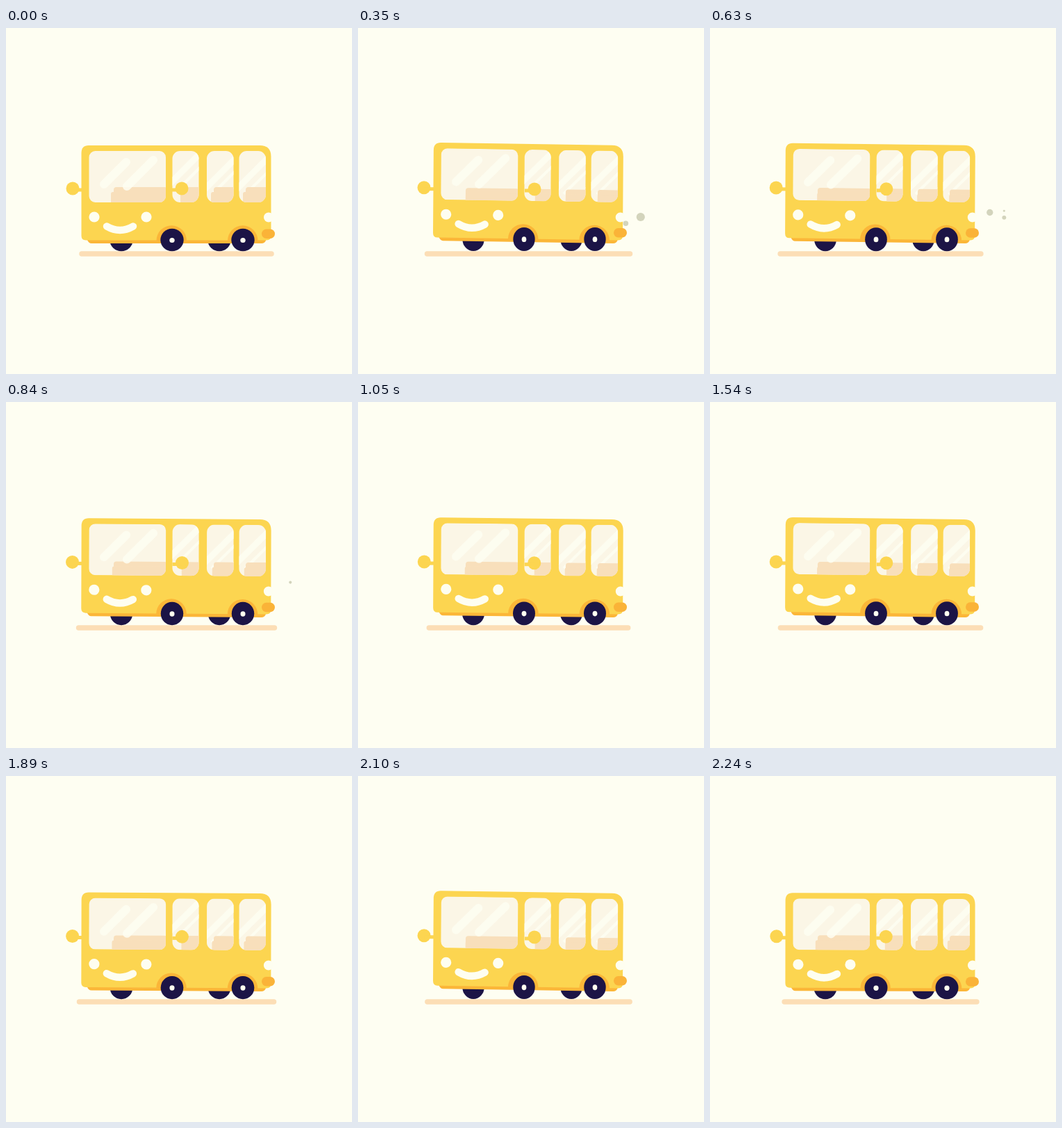
An HTML page for the animation above (2310 ms loop, 498 px wide and 498 px high).

```html
<!DOCTYPE html>
<html lang="en">
<head>
<meta charset="utf-8">
<title>Bus</title>
<style>
  html, body { margin: 0; width: 100%; height: 100%; overflow: hidden; background: #fefef2; }
  svg { display: block; width: 100vw; height: 100vh; }
</style>
</head>
<body>
<svg viewBox="0 0 498 498">
  <defs>
    <clipPath id="glass">
      <rect x="119.500" y="177" width="110.500" height="74" rx="9"/>
      <rect x="239.500" y="177" width="38" height="74" rx="11"/>
      <rect x="289" y="177" width="38.500" height="74" rx="11"/>
      <rect x="335.500" y="177" width="38.500" height="74" rx="11"/>
    </clipPath>
  </defs>

  <line id="shadow" y1="325" y2="325" stroke="#fcdeb6" stroke-width="7.500" stroke-linecap="round"/>
  <g id="smoke" fill="#d3d4bc"></g>
  <g id="farWheels"></g>

  <g id="body">
    <path d="M117 302H374V306Q372 310 368 310H123Q119 310 117 305Z" fill="#fbb638"/>
    <path d="M119 169H365Q381.500 169 381.500 185V299Q381.500 305.500 375 305.500H115Q108.500 305.500 108.500 299V180Q108.500 169 119 169Z" fill="#fcd550"/>
    <g clip-path="url(#glass)">
      <rect x="100" y="170" width="290" height="90" fill="#fbf6e6"/>
      <g stroke="#fefef2" stroke-opacity=".85" fill="none">
        <path d="M234 226L278 182M284 234L332 186M330 234L378 186" stroke-width="9"/>
        <path d="M246 234L284 196M296 240L334 202M344 240L382 202" stroke-width="4"/>
      </g>
      <g id="seats" fill="#f8dfbb"></g>
      <path d="M141 225L173 193M174 228L212 190" stroke="#fefef2" stroke-opacity=".85" stroke-width="12" stroke-linecap="round"/>
    </g>
    <g fill="#fefef0">
      <circle cx="127" cy="272" r="7.600"/>
      <circle cx="202" cy="272" r="7.600"/>
      <circle cx="378" cy="272.500" r="7"/>
    </g>
    <path d="M145 285.500Q164 296.500 183 285.500" fill="none" stroke="#fefef0" stroke-width="10.500" stroke-linecap="round"/>
    <g fill="#fbb638">
      <path d="M216.500 306A21.700 21.700 0 0 1 260 306Z"/>
      <path d="M319 306A21.700 21.700 0 0 1 362.500 306Z"/>
    </g>
  </g>

  <rect id="bumper" x="368" width="19" height="13.500" rx="6.700" fill="#fab338"/>
  <g id="mirrors" fill="#fcd550" stroke="#fcd550"></g>
  <g id="wheels"></g>
</svg>
<script>
  const LOOP = 2310, STEP = 70, BOUNCES = 5;
  const $ = id => document.getElementById(id);

  function add(parent, tag, attrs = {}) {
    const el = document.createElementNS('http://www.w3.org/2000/svg', tag);
    parent.append(el);
    return set(el, attrs);
  }

  function set(el, attrs) {
    for (const name in attrs) el.setAttribute(name, attrs[name]);
    return el;
  }

  // Phase and lift of the nose: a springy rise and a quick drop.
  const lifts = [[0, 0], [.09, .37], [.27, .7], [.35, .82], [.6, 1], [.758, 1], [.848, .2], [1, 0]];

  function liftAt(phase) {
    const i = Math.max(1, lifts.findIndex(p => p[0] >= phase));
    const [p0, v0] = lifts[i - 1], [p1, v1] = lifts[i];
    return v0 + (v1 - v0) * (phase - p0) / (p1 - p0);
  }

  const seats = [[155, 232], [255, 280], [299, 330], [345, 378]].map(([x, end]) => ({
    x, end,
    back: add($('seats'), 'rect', { rx: 4 }),
    base: add($('seats'), 'rect', { rx: 3 })
  }));

  const mirrors = [[96, 14], [253, -14]].map(([x, stalk]) => {
    const g = add($('mirrors'), 'g');
    add(g, 'circle', { cx: x, cy: 231, r: 9.5, stroke: 'none' });
    add(g, 'path', { d: `M${x} 233h${stalk}`, 'stroke-width': 5 });
    return g;
  });

  const addTyre = (group, cx) => add($(group), 'ellipse', { cx, fill: '#1c1446' });
  const farTyres = [166, 307].map(cx => addTyre('farWheels', cx));
  const nearTyres = [239, 341].map(cx => addTyre('wheels', cx));
  const hubs = [239, 341].map(cx => add($('wheels'), 'ellipse', { cx, fill: '#fefef0' }));

  const puffs = [
    { born: 140, life: 560, from: [380, 286], to: [424, 263], size: 6.2 },
    { born: 280, life: 700, from: [379.5, 286.5], to: [410.5, 258.5], size: 5.3 },
    { born: 364, life: 350, from: [380, 287], to: [426, 272], size: 6.5 }
  ].map(p => ({ ...p, el: add($('smoke'), 'circle') }));

  function drawPuff({ born, life, from, to, size, el }, t) {
    const f = Math.min(1, Math.max(0, (t - born) / life));
    const ease = 1 - (1 - f) ** 2;
    set(el, {
      cx: from[0] + (to[0] - from[0]) * ease,
      cy: from[1] + (to[1] - from[1]) * ease,
      r: Math.max(0, size * Math.sin(Math.PI * f ** .6))
    });
  }

  // Shears the body so that its nose rises and its roof leans back a little.
  function bodyMatrix(lift) {
    const rise = .0152 * lift, lean = -.007 * lift;
    return `matrix(1 ${rise} ${lean} 1 ${-.5 * lift - lean * 300} ${-rise * 375})`;
  }

  function draw(t) {
    const lift = liftAt(t / LOOP * BOUNCES % 1);
    const rest = 1 - lift;

    set($('body'), { transform: bodyMatrix(lift) });
    const half = 136.5 + 9.5 * lift;
    set($('shadow'), { x1: 245.5 - half, x2: 245.5 + half });
    set($('bumper'), { y: 289.5 - 1.5 * lift });
    set(mirrors[0], { transform: `translate(${-lift} ${-1.3 * lift})` });
    set(mirrors[1], { transform: `translate(${lift} ${lift})` });

    for (const { x, end, back, base } of seats) {
      const top = 229 + 4.5 * lift;
      set(back, { x, y: top, width: end - x, height: 40 });
      set(base, { x: x - 4 * rest, y: top + 7, width: end - x, height: 40 });
    }
    for (const tyre of [...farTyres, ...nearTyres])
      set(tyre, { cy: 305 - lift, rx: 16.7 - lift, ry: 16.3 + .8 * lift });
    for (const hub of hubs)
      set(hub, { cy: 305.5 - 1.3 * lift, rx: 3.7 - .4 * lift, ry: 3.6 + .3 * lift });
    for (const p of puffs) drawPuff(p, t);
  }

  const start = performance.now();
  function tick() {
    const t = (performance.now() - start) % LOOP;
    draw(Math.floor(t / STEP) * STEP);
    requestAnimationFrame(tick);
  }
  tick();
</script>
</body>
</html>
```
